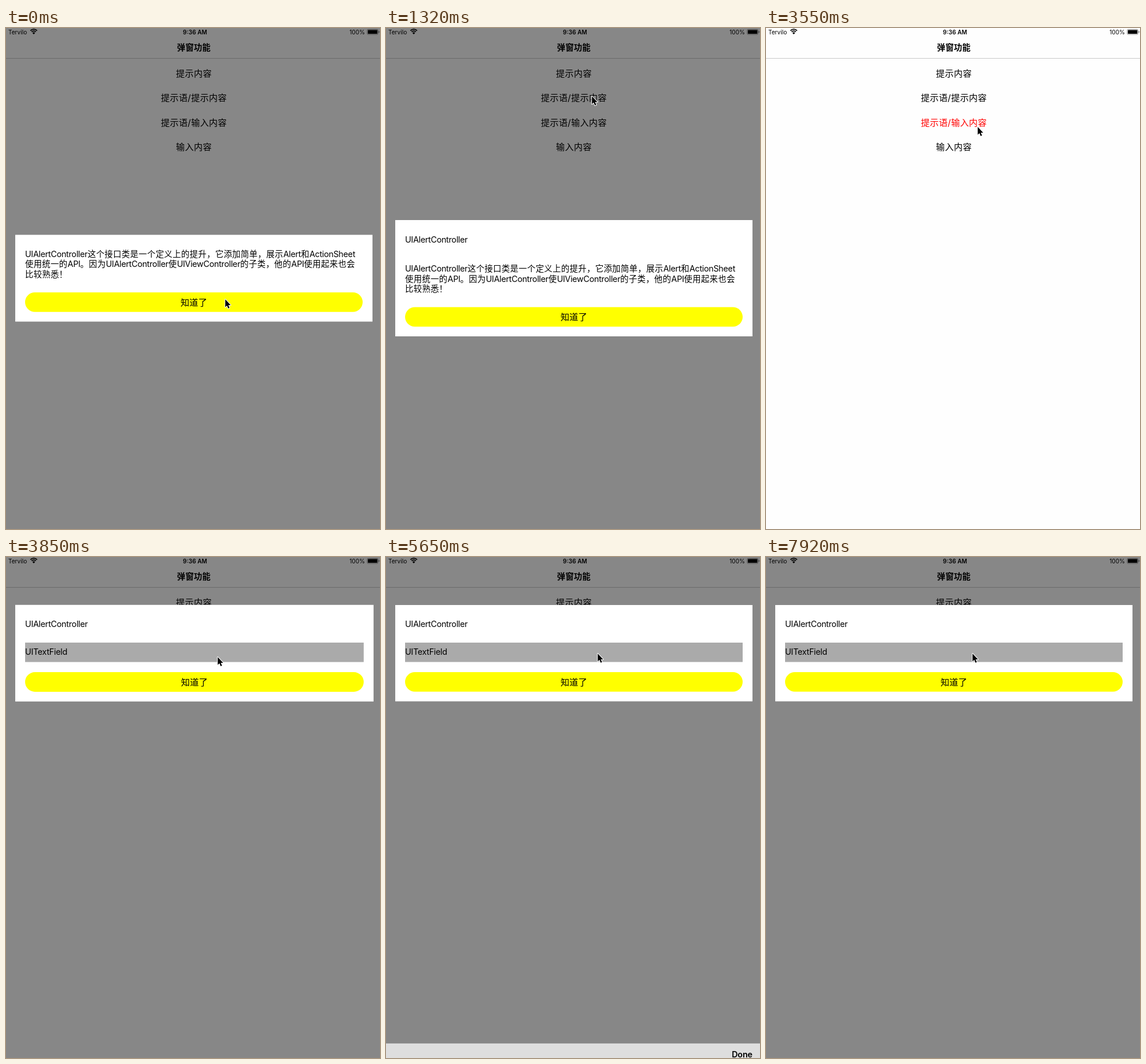
Animation, 647 px wide and 866 px high, one loop 8000 ms. Source, as an HTML page:

```html
<!DOCTYPE html>
<html lang="zh-CN">
<head>
<meta charset="utf-8">
<title>弹窗功能</title>
<style>
  html, body { margin: 0; width: 100%; height: 100%; overflow: hidden; background: #fefefe; }
  svg { display: block; width: 647px; height: 866px; }
  text { font-family: Inter, "Noto Sans CJK SC", "Noto Sans CJK JP", "Noto Sans CJK", sans-serif; white-space: pre; }
  .line { fill: none; stroke: #222; stroke-width: 1.3; stroke-linecap: round; stroke-linejoin: round; }
  .tool { fill: none; stroke: #85888d; stroke-width: 1.3; stroke-linecap: round; stroke-linejoin: round; }
</style>
</head>
<body>
<svg id="stage" viewBox="0 0 647 866" xmlns="http://www.w3.org/2000/svg"></svg>
<script>
const LOOP = 8000;
const stage = document.getElementById('stage');
const clamp = v => Math.max(0, Math.min(1, v));
const easeOut = u => 1 - (1 - clamp(u)) ** 3;
const smooth = u => u * u * (3 - 2 * u);
const esc = s => s.replace(/&/g, '&amp;').replace(/</g, '&lt;');

const rect = (x, y, w, h, fill, r = 0) =>
  `<rect x="${x}" y="${y}" width="${w}" height="${h}" rx="${r}" fill="${fill}"/>`;
const text = (x, y, s, size, more = '') =>
  `<text x="${x}" y="${y}" font-size="${size}" ${more}>${esc(s)}</text>`;
const mid = (x, y, s, size, more = '') => text(x, y, s, size, 'text-anchor="middle" ' + more);
const path = (d, cls, more = '') => `<path d="${d}" class="${cls}" ${more}/>`;

// Body copy: Latin runs are set tighter than Chinese runs.
const copy = (x, y, s) => `<text x="${x}" y="${y}" font-size="14.3">` +
  s.split(/([\u3000-\uffff]+)/).filter(Boolean)
    .map(run => `<tspan letter-spacing="${run.charCodeAt(0) > 0x2fff ? .42 : -.28}">${run}</tspan>`)
    .join('') + '</text>';

// Page
const ROWS = ['提示内容', '提示语/提示内容', '提示语/输入内容', '输入内容'];

function statusBar() {
  const arc = r => {
    const d = r * .72;
    return `M${48 - d} ${10.4 - d}A${r} ${r} 0 0 1 ${48 + d} ${10.4 - d}`;
  };
  return text(4, 10.6, 'Tervilo', 10.1) +
    `<path d="${arc(8)}${arc(5.2)}" fill="none" stroke="#000" stroke-width="1.8"/>` +
    '<path d="M48 11L45.7 8.5A3.2 3.2 0 0 1 50.3 8.5Z"/>' +
    mid(327, 10.6, '9:36 AM', 10.1, 'font-weight="600"') +
    text(621, 10.6, '100%', 10.1, 'text-anchor="end"') +
    '<rect x="624.9" y="2.4" width="18.6" height="8.8" rx="1.8" fill="none" stroke="#000" stroke-opacity=".5" stroke-width=".8"/>' +
    rect(626, 3.5, 16.4, 6.6, '#000', .8) +
    '<path d="M644.5 5.2q1.7 .3 1.7 1.6t-1.7 1.6Z" fill-opacity=".5"/>';
}

function page() {
  return rect(0, 0, 647, 866, '#fefefe') + statusBar() +
    mid(325, 39.3, '弹窗功能', 14.3, 'font-weight="600" letter-spacing=".3"') +
    rect(0, 52, 647, 1, '#c9c9c9') +
    ROWS.map((s, i) => mid(325, 83.7 + 42.5 * i, s, 15.2, `class="row" letter-spacing=".3"`)).join('');
}

// Alerts
const MESSAGE = [
  'UIAlertController这个接口类是一个定义上的提升，它添加简单，展示Alert和ActionSheet',
  '使用统一的API。因为UIAlertController使UIViewController的子类，他的API使用起来也会',
  '比较熟悉！'
];
const message = y => MESSAGE.map((s, i) => copy(33, y + 17.25 * i, s)).join('');
const heading = y => copy(33, y, 'UIAlertController');

function alertBox(top, height, body) {
  const y = top + height - 50.5;
  return '<g class="alert">' + rect(16, top, 618, height, '#fff') + body +
    rect(33, y, 584, 33.7, '#ff0', 16.85) +
    mid(325, y + 22.5, '知道了', 15.2, 'letter-spacing=".2"') + '</g>';
}

const alerts = () =>
  alertBox(357.5, 150, message(396)) +
  alertBox(332, 201, heading(371.2) + message(421.3)) +
  alertBox(83, 166.5, heading(121) + rect(33, 148, 584, 33.5, '#aaa') +
    copy(33, 169, 'UITextField') +
    '<rect id="caret" x="104.3" y="155" width="1.6" height="18" fill="#3f6bd8"/>');

// Keyboard
const GREY = '#a3abb5';
const key = (x, y, w, h = 47, fill = '#fff') =>
  rect(x, y + 1, w, h, '#8b8f95', 4.5) + rect(x, y, w, h, fill, 4.5);

function letters(chars, hints, x, y, step, w, h) {
  return [...chars].map((c, i) => {
    const left = x + step * i, cx = left + w / 2;
    return key(left, y, w, h) +
      mid(cx, y + 15.8, hints[i], 10.2, 'fill="#b9babd"') +
      mid(cx, y + 38.6, c, 21);
  }).join('');
}

const pair = (x, top, low) => key(x, 759, 47.5) +
  mid(x + 23.75, 782, top, 18) + mid(x + 23.75, 797, low, 18);

const shift = cx =>
  path(`M${cx} 773.5l10 10h-5v7.2q0 1 -1 1h-8q-1 0 -1 -1v-7.2h-5Z`, 'line');

function tools() {
  return path('M24.5 617.5l-3.6 3.7 3.6 3.7M21 621.2h12q4.6 .4 4.6 5.4t-4.6 5.6h-9.5', 'tool') +
    path('M70.5 617.5l3.6 3.7 -3.6 3.7M74 621.2h-12q-4.6 .4 -4.6 5.4t4.6 5.6h9.5', 'tool') +
    path('M96.5 620v-2.5h11v12h-3M93 620.5h10.5v12.5h-10.5ZM99.5 617.5v-1.5h5v1.5', 'tool') +
    path('M95.5 620.5h5.5', 'tool', 'stroke-width="2.5"');
}

function icons() {
  const dots = [831, 834.5].map(y => `M612 ${y}h20`).join('');
  return path('M608.5 673.7l6.6 -7.4q.8 -.9 2 -.9h12q2.4 0 2.4 2.4v11.8q0 2.4 -2.4 2.4h-12q-1.2 0 -2 -.9Z' +
      'M619.3 670l7 7.2M626.3 670l-7 7.2', 'line') +
    shift(28) + shift(613.5) +
    '<circle cx="86" cy="837" r="9.3" class="line"/>' +
    '<circle cx="82.7" cy="834" r="1.4"/><circle cx="89.3" cy="834" r="1.4"/>' +
    path('M80 838.5h12q-.8 5 -6 5t-6 -5Z', 'line') +
    rect(140.5, 827, 6, 12.5, '#222', 3) +
    path('M137.8 834.5v1.5a5.7 5.7 0 0 0 11.4 0v-1.5M143.5 842v4.5M140.3 846.5h6.4', 'line') +
    '<rect x="609.5" y="827.5" width="25" height="14" rx="1.8" class="line"/>' +
    path(dots, 'line', 'style="stroke-width:1.7;stroke-dasharray:.1 3.2"') +
    path('M615.5 838h13M618.5 845.5l3.5 2.8 3.5 -2.8', 'line');
}

function keyboard() {
  const small = (x, w, s, y, size) => mid(x + w / 2, y, s, size, 'fill="#111"');
  return '<g id="keyboard">' +
    rect(0, 564, 647, 37.5, '#dedede') +
    text(633.7, 588, 'Done', 14.3, 'text-anchor="end" font-weight="600" letter-spacing="-.2"') +
    rect(0, 601.5, 647, 265, '#cdd0d7') + tools() +
    [133, 262, 391].map(x => rect(x, 610, 126, 30.5, '#b0b6c0', 3)).join('') +
    letters('qwertyuiop', '1234567890', 4, 649, 59, 48.7, 48) +
    key(594, 649, 52, 48, GREY) +
    letters('asdfghjkl', '@#$&*()\'"', 29, 705, 58.55, 48.2, 47) +
    key(556, 705, 90, 47, GREY) + small(556, 90, 'return', 733, 14) +
    key(4, 759, 47.5, 47, GREY) +
    letters('zxcvbnm', '%-+=/;:', 62, 759, 57.75, 47.5, 47) +
    pair(466, '!', ',') + pair(523.7, '?', '.') +
    key(582, 759, 64, 47, GREY) +
    key(4, 814, 47.5, 47, GREY) + small(4, 47.5, '.?123', 842, 13.2) +
    key(62, 814, 47.5, 47, GREY) + key(119.7, 814, 47.5, 47, GREY) +
    key(177.3, 814, 336, 47) +
    key(524, 814, 64, 47, GREY) + small(524, 64, '.?123', 842, 13.2) +
    key(598.5, 814, 47.5, 47, GREY) + icons() + '</g>';
}

stage.innerHTML = page() +
  '<g id="overlay"><rect width="647" height="866" fill="#000" fill-opacity=".47"/>' + alerts() + '</g>' +
  keyboard() +
  '<path id="cursor" d="M.3 1V14.6L3.3 11.8L5.4 16.8L7.7 15.8L5.6 10.9H9.7Z" stroke="#fff" ' +
  'stroke-width="2" stroke-linejoin="round" paint-order="stroke"/>';

const $ = id => document.getElementById(id);
const overlay = $('overlay'), kb = $('keyboard'), caret = $('caret'), cursor = $('cursor');
const rowEls = [...stage.querySelectorAll('.row')];
const alertEls = [...stage.querySelectorAll('.alert')];

// Screen refreshes: first, last, count
const BURSTS = [
  [150, 1030, 7], [1320, 1320, 1], [1620, 2220, 5], [2670, 3550, 7], [3700, 4000, 3],
  [4450, 4600, 2], [5650, 5940, 3], [6300, 6600, 3], [6890, 7920, 8]
];

function snap(t) {
  let at = 0;
  for (const [a, b, n] of BURSTS) {
    if (t < a) break;
    const gap = n > 1 ? (b - a) / (n - 1) : 1;
    at = a + gap * Math.min(n - 1, Math.floor((t - a) / gap + 1e-4));
  }
  return at;
}

// Pointer stops: time, x, y
const STOPS = [
  [0, 379, 468], [200, 379, 468], [900, 356, 117], [1520, 356, 117], [2200, 365, 500],
  [2720, 365, 500], [3420, 366, 170], [3560, 366, 170], [3700, 366, 172], [4300, 366, 172],
  [4600, 366, 166], [6200, 366, 166], [6600, 388, 357], [6950, 388, 357], [7900, 357, 166]
];

function pointer(t) {
  const i = STOPS.findIndex(s => s[0] > t);
  if (i < 0) return STOPS[STOPS.length - 1].slice(1);
  const [a, x, y] = STOPS[i - 1], [b, x2, y2] = STOPS[i];
  const u = smooth((t - a) / (b - a));
  return [x + (x2 - x) * u, y + (y2 - y) * u];
}

const show = (el, on) => el.setAttribute('visibility', on ? 'visible' : 'hidden');

function render(time) {
  const t = snap(time);

  const current = t < 1320 ? 0 : t < 3700 ? 1 : 2;
  const leaving = [150, 2670, LOOP][current];
  const alpha = t < leaving ? 1 : clamp(.5 - (t - leaving) / 290);
  overlay.setAttribute('opacity', alpha);
  alertEls.forEach((el, i) => el.setAttribute('display', i === current ? 'inline' : 'none'));

  const scale = 1 + .048 * (1 - clamp((t - 3700) / 200)) ** 2;
  alertEls[2].setAttribute('transform', `translate(16 166.25) scale(${scale}) translate(-16 -166.25)`);

  const pressed = t >= 1029 && t < 1320 ? 1 : t >= 3549 && t < 3700 ? 2 : -1;
  rowEls.forEach((el, i) => el.setAttribute('fill', i === pressed ? '#f00' : '#000'));

  const rise = easeOut((t - 5642) / 280) - easeOut((t - 6870) / 280);
  show(kb, rise > 0);
  kb.setAttribute('transform', `translate(0 ${302 * (1 - rise)})`);
  show(caret, t >= 5780 && t < 6890);

  const [x, y] = pointer(t);
  cursor.setAttribute('transform', `translate(${x} ${y})`);
}

const start = performance.now();
function tick() {
  render((performance.now() - start) % LOOP);
  requestAnimationFrame(tick);
}
tick();
</script>
</body>
</html>
```
